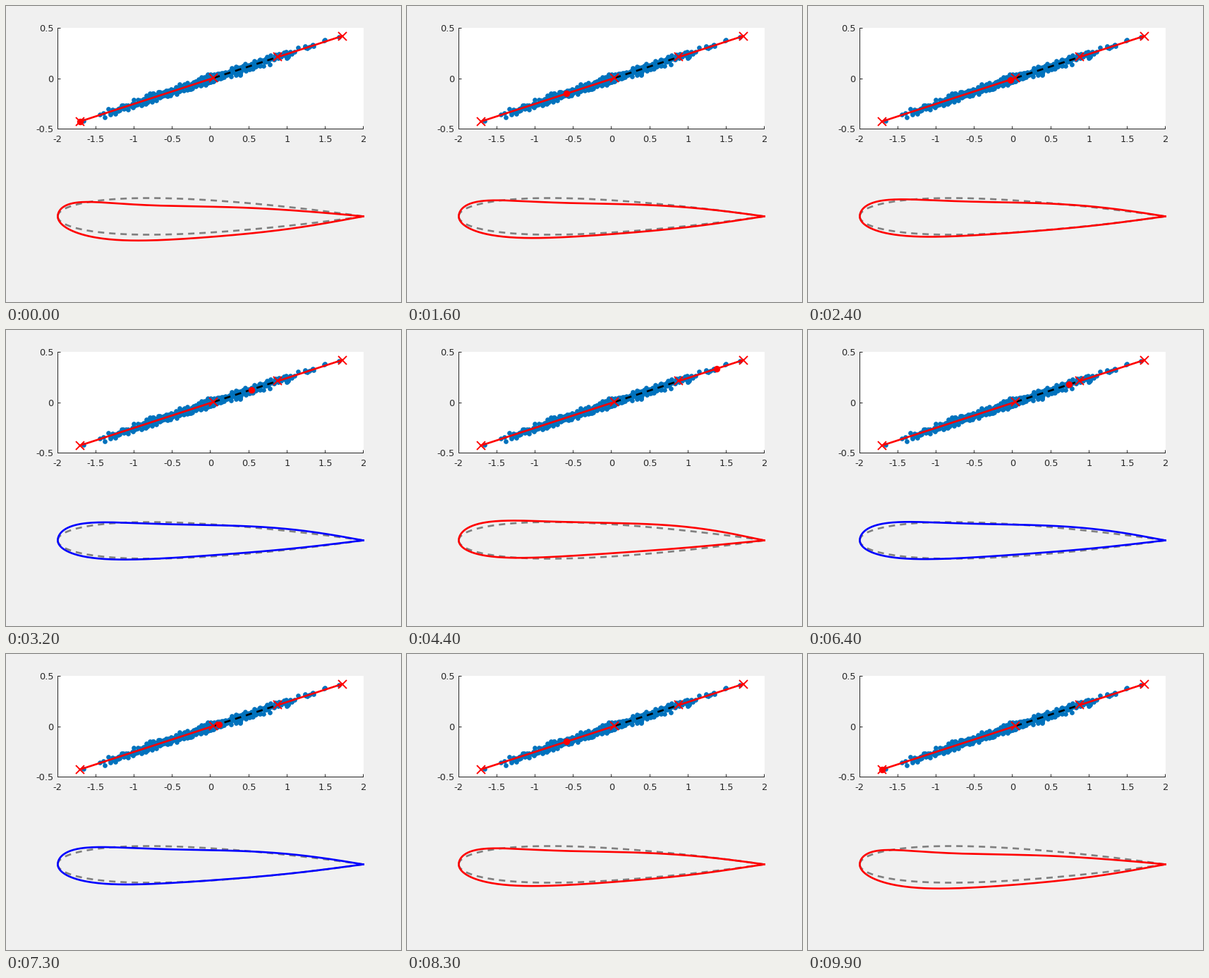
These frames come from a looping animation (560 px wide and 420 px high, 10 s). A matplotlib script:

```python
import numpy as np
import matplotlib.pyplot as plt
from matplotlib.animation import FuncAnimation
from matplotlib.patches import Rectangle

W, H, DPI = 560, 420, 100
PT = 72 / DPI  # points per pixel
STEPS = 50
FIRST, LAST = 25, 37  # ends of the middle section
REACH, SLOPE = 1.714, 0.2466
CHORD, NOSE, MID = 433, 73.4, 298.5
THICK = 2.67
DARK = "#262626"

fig = plt.figure(figsize=(W / DPI, H / DPI), dpi=DPI, facecolor="#F0F0F0")
ax = fig.add_axes([0, 0, 1, 1])
ax.set_xlim(0, W)
ax.set_ylim(H, 0)
ax.axis("off")


def on_plot(x, offset=0):
    """Pixel position of data x on the trend line, plus a vertical offset."""
    x = np.asarray(x)
    return 290.6 + 108.5 * x, 103.3 - 143.5 * (SLOPE * x + offset)


def line(x, y, color, width=THICK, **style):
    return ax.plot(x, y, color=color, lw=width * PT, **style)[0]


def dashed(x, y, color, **style):
    return line(x, y, color, linestyle=(0, (9 / THICK, 7 / THICK)),
                dash_capstyle="butt", **style)


def rule(x, y):
    line(x, y, DARK, width=1, solid_capstyle="butt", snap=False, zorder=1.5)


def label(x, y, value, ha):
    ax.text(x, y, f"{value:g}", ha=ha, va="baseline", color=DARK,
            family="DejaVu Sans", size=12.9 * PT)


def draw_axes():
    ax.add_patch(Rectangle((73, 31), 434, 144, color="white", lw=0))
    rule([73, 507], [174.5, 174.5])
    rule([73.5, 73.5], [31, 175])
    for v in np.linspace(-2, 2, 9):
        x = np.floor(289.9 + 108.3 * v) + 0.5
        rule([x, x], [170.5, 175])
        label(289.8 + 108.5 * v, 193.3, v, "center")
    for v in (-0.5, 0, 0.5):
        y = np.floor(103 - 143 * v) + 0.5
        rule([73, 77.5], [y, y])
        label(67.2, y + 4.4, v, "right")


def draw_cloud():
    rng = np.random.default_rng(7)
    x = rng.normal(0, 0.66, 520)
    x = x[abs(x) < REACH]
    x, y = on_plot(x, rng.normal(0, 0.02, x.size))
    ax.plot(x, y, "o", color="#0072BD", ms=6.7 * PT, mew=0, zorder=2)


def draw_trend(path):
    for a, b in ((0, FIRST), (LAST, STEPS - 1)):
        line(*on_plot(path[[a, b]]), "red", zorder=3)
    dashed(*on_plot(path[[FIRST, LAST]]), "black", zorder=3)
    ax.plot(*on_plot(path[[0, FIRST, LAST, STEPS - 1]]), "x", color="red",
            ms=11.6 * PT, mew=1.9 * PT, zorder=4)


# Airfoil surfaces: a class function times a quartic through a few points
s = (1 - np.cos(np.linspace(0, np.pi, 161))) / 2
foil_x = NOSE + CHORD * s


def surface(*values):
    shape = np.polyfit([0.03, 0.15, 0.4, 0.7, 0.93], values, 4)
    return CHORD * np.sqrt(s) * (1 - s) * np.polyval(shape, s)


upper_start = surface(0.222, 0.138, 0.0885, 0.096, 0.099)
upper_end = surface(0.246, 0.202, 0.163, 0.204, 0.232)
lower_start = surface(0.229, 0.222, 0.196, 0.192, 0.190)
lower_end = surface(0.198, 0.165, 0.121, 0.101, 0.092)


def foil_y(w):
    top = upper_start + w * (upper_end - upper_start)
    bottom = lower_start + w * (lower_end - lower_start)
    return np.concatenate([MID - top[::-1], MID + bottom[1:]])


def draw_base_foil():
    # NACA 0012
    half = 0.6 * CHORD * (0.2969 * np.sqrt(s) - 0.126 * s - 0.3516 * s**2
                          + 0.2843 * s**3 - 0.1036 * s**4)
    for side in (-1, 1):
        dashed(foil_x, MID + side * half, "#808080")


path = np.linspace(-REACH, REACH, STEPS)
draw_axes()
draw_cloud()
draw_trend(path)
draw_base_foil()
dot = ax.plot([], [], "o", color="red", ms=9.4 * PT, mew=0, zorder=5)[0]
foil = line(np.concatenate([foil_x[::-1], foil_x[1:]]), foil_y(0), "red",
            zorder=4, solid_joinstyle="round")


def update(i):
    k = min(i, 2 * STEPS - 1 - i)
    dot.set_data(*on_plot(path[[k]]))
    foil.set_ydata(foil_y(k / (STEPS - 1)))
    foil.set_color("blue" if FIRST <= k < LAST else "red")
    return dot, foil


anim = FuncAnimation(fig, update, frames=2 * STEPS, interval=100, repeat=True,
                     repeat_delay=0)
plt.show()
```
